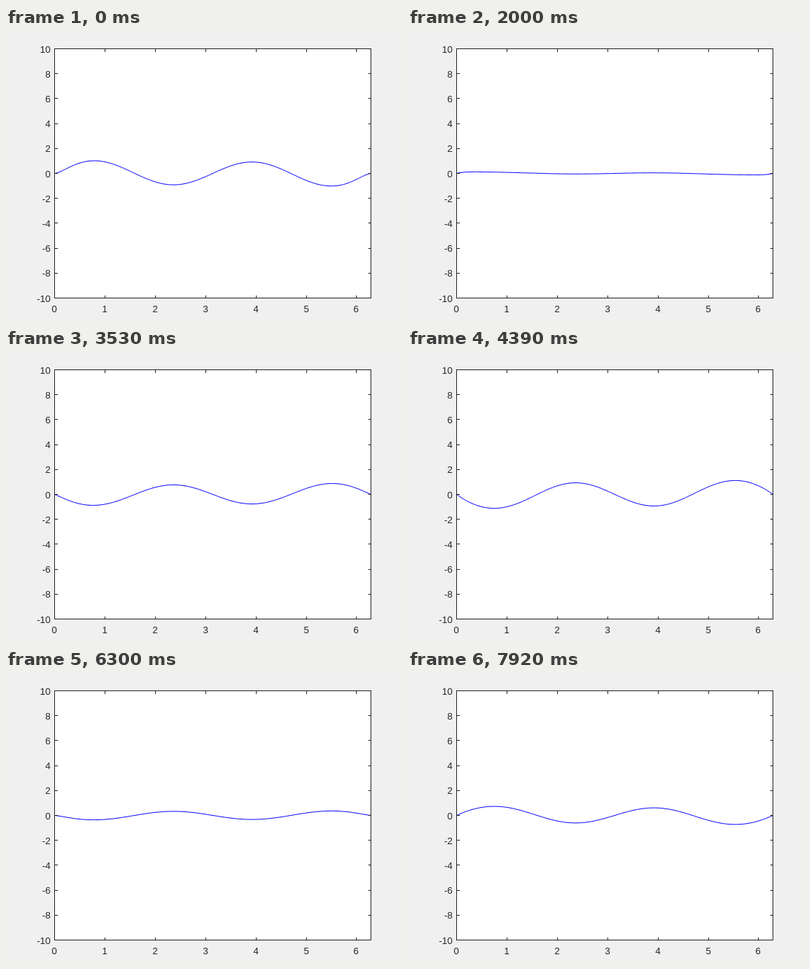
These frames come from a looping animation (542 px wide and 402 px high, 7.99 s). An HTML page:

```html
<!DOCTYPE html>
<html lang="en">
<head>
<meta charset="utf-8">
<title>Standing wave</title>
<style>
  html, body { margin: 0; width: 100%; height: 100%; overflow: hidden; background: #f0f0f0; }
  svg { display: block; }
  text { font: 13px "Liberation Sans", Arial, sans-serif; fill: #262626; }
  #axes { fill: none; stroke: #262626; shape-rendering: crispEdges; }
  #wave { fill: none; stroke: #00f; stroke-linejoin: round; }
</style>
</head>
<body>
<svg width="542" height="402" viewBox="0 0 542 402">
  <rect x="66.5" y="28.5" width="433" height="342" fill="#fff"/>
  <path id="wave"/>
  <path id="axes"/>
  <g id="labels"></g>
</svg>
<script>
const LEFT = 66.5, RIGHT = 499.5, TOP = 28.5, BOTTOM = 370.5;
const SPAN = 2 * Math.PI, TICK = 4;
const LOOP = 7990, FPS = 13;

const px = x => LEFT + x / SPAN * (RIGHT - LEFT);
const py = y => (TOP + BOTTOM) / 2 - y * (BOTTOM - TOP) / 20;
const snap = v => Math.floor(v) + 0.5;
const byId = id => document.getElementById(id);

function addLabel(value, x, y, anchor) {
  const label = document.createElementNS('http://www.w3.org/2000/svg', 'text');
  label.setAttribute('x', x);
  label.setAttribute('y', y);
  label.setAttribute('text-anchor', anchor);
  label.textContent = value;
  byId('labels').append(label);
}

function drawAxes() {
  let d = `M${LEFT} ${TOP}H${RIGHT}V${BOTTOM}H${LEFT}Z`;
  for (let i = 0; i <= 6; i++) {
    const x = snap(px(i));
    d += `M${x} ${TOP}v${TICK}M${x} ${BOTTOM}v${-TICK}`;
    addLabel(i, x - 0.5, 390, 'middle');
  }
  for (let v = -10; v <= 10; v += 2) {
    const y = snap(py(v));
    d += `M${LEFT} ${y}h${TICK}M${RIGHT} ${y}h${-TICK}`;
    addLabel(v, 61, Math.round(py(v) + 5), 'end');
  }
  byId('axes').setAttribute('d', d);
}

// Strength of the wide and narrow edge terms: [step, wide, narrow]
const edgeKeys = [
  [0, 0.9, -2.3], [26, 0.3, 0.7], [36, -0.4, 1.2], [57, -1.25, 0.2],
  [73, -0.85, 0.15], [90, 0.25, 0.8], [103, 0.8, -0.15]
];

function edgeStrength(step) {
  const i = Math.max(1, edgeKeys.findIndex(key => key[0] >= step));
  const a = edgeKeys[i - 1], b = edgeKeys[i];
  const p = (step - a[0]) / (b[0] - a[0]);
  const mix = n => a[n] + (b[n] - a[n]) * p;
  return [mix(1), mix(2)];
}

// Bump beside each end of the string, odd about its middle
function edge(x, width) {
  const bump = s => s * Math.exp(-s / width);
  return bump(x) - bump(SPAN - x);
}

function drawWave(step) {
  const swing = -0.945 * Math.cos(Math.PI * (step - 58) / 62);
  const [wide, narrow] = edgeStrength(step);
  const points = [];
  for (let i = 0; i <= 200; i++) {
    const x = SPAN * i / 200;
    const y = swing * Math.sin(2 * x) + wide * edge(x, 0.45) + narrow * edge(x, 0.2);
    points.push(px(x).toFixed(2) + ' ' + py(y).toFixed(2));
  }
  byId('wave').setAttribute('d', 'M' + points.join('L'));
}

function tick() {
  const time = performance.now() % LOOP;
  drawWave(Math.min(103, Math.floor((time + 10) * FPS / 1000)));
  requestAnimationFrame(tick);
}

drawAxes();
tick();
</script>
</body>
</html>
```
